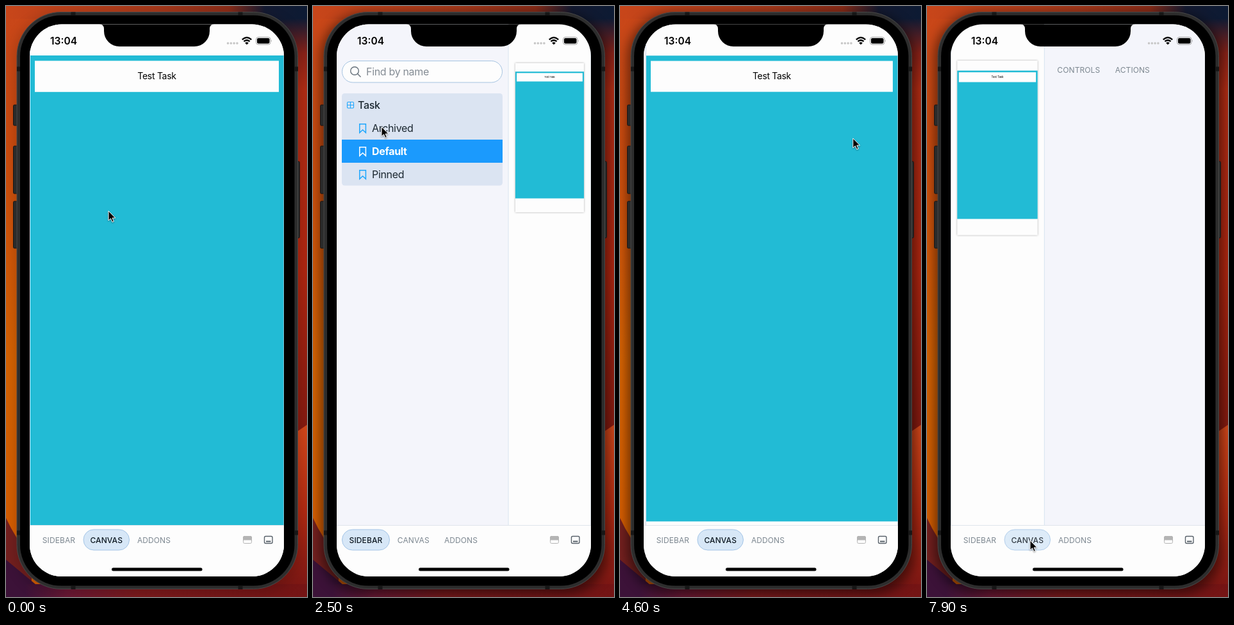
These frames come from a looping animation (470x920 px, 8 s). An HTML page:

```html
<!DOCTYPE html>
<html lang="en">
<head>
<meta charset="utf-8">
<title>Phone story browser</title>
<style>
  html, body { margin: 0; width: 100%; height: 100%; overflow: hidden; background: #7a1a10; }
  svg { display: block; width: 470px; height: 920px; }
  text { font: 16px Inter, "Open Sans", sans-serif; letter-spacing: -.02em; fill: #1b2730; }
  .mid { text-anchor: middle; }
  .tab { font-size: 12px; letter-spacing: .1px; text-anchor: middle; fill: #7c8790; }
  .on .tab { fill: #0f1a24; font-weight: 500; }
  .pill { fill: #d7e7f7; stroke: #a3c4e6; visibility: hidden; }
  .on .pill { visibility: visible; }
  .mark { fill: none; stroke: #1ea7fd; stroke-width: 1.5; }
  .row rect { fill: none; }
  .row.on rect { fill: #1b9afd; }
  .row.on text { fill: #fff; font-weight: 700; }
  .row.on .mark { stroke: #fff; }
  .field { fill: #fdfdfd; stroke: #a5c3e0; }
  .json text { font-size: 14px; letter-spacing: 0; }
  .panel { fill: #f4f5fb; }
  .edge { stroke: #d6e2f0; }
  .key { fill: #2b2b2b; stroke: #151515; }
</style>
</head>
<body>
<svg viewBox="0 0 470 920">
  <defs>
    <linearGradient id="left" x2="0" y2="1">
      <stop offset="0" stop-color="#c8461a"/><stop offset=".25" stop-color="#cc4c0e"/>
      <stop offset=".6" stop-color="#d66303"/><stop offset=".86" stop-color="#d65e02"/>
    </linearGradient>
    <linearGradient id="right" x2="0" y2="1">
      <stop offset=".02" stop-color="#0c1a33"/><stop offset=".08" stop-color="#8a2218"/>
      <stop offset=".14" stop-color="#b02c14"/><stop offset=".45" stop-color="#ae2610"/>
      <stop offset=".72" stop-color="#841a10"/>
    </linearGradient>
    <linearGradient id="glow" x2="0" y2="1">
      <stop offset="0" stop-color="#d4481a"/><stop offset=".5" stop-color="#b22a12"/><stop offset="1" stop-color="#741414"/>
    </linearGradient>
    <linearGradient id="top">
      <stop offset="0" stop-color="#c8461a"/><stop offset=".5" stop-color="#a4381a"/>
      <stop offset=".74" stop-color="#8a2c18"/><stop offset=".86" stop-color="#141a31"/><stop offset="1" stop-color="#0c1a33"/>
    </linearGradient>
    <linearGradient id="base">
      <stop offset="0" stop-color="#3c1238"/><stop offset=".15" stop-color="#6a1834"/>
      <stop offset=".4" stop-color="#7c1a1c"/><stop offset="1" stop-color="#741414"/>
    </linearGradient>
    <clipPath id="screen"><rect x="37" y="28.5" width="397" height="859.5" rx="50"/></clipPath>
    <filter id="blur" x="-20%" width="140%" y="-10%" height="120%"><feGaussianBlur stdDeviation="9"/></filter>
  </defs>

  <!-- wallpaper -->
  <rect width="235" height="920" fill="url(#left)"/>
  <rect x="235" width="235" height="920" fill="url(#right)"/>
  <rect width="470" height="20" fill="url(#top)"/>
  <path d="M420 686L470 652V920H420Z" fill="url(#glow)"/>
  <path d="M0 797Q14 828 40 860V920H0Z" fill="#74201f"/>
  <path d="M0 862L70 920H0Z" fill="#3c1238"/>
  <rect x="30" y="900" width="440" height="20" fill="url(#base)"/>
  <rect id="shade" x="12" y="12" width="449" height="904" rx="68" filter="url(#blur)"/>

  <!-- phone body -->
  <g class="key">
    <rect x="11.5" y="154" width="8" height="32" rx="1.5"/>
    <rect x="11.5" y="218" width="8" height="74" rx="1.5"/>
    <rect x="11.5" y="304" width="8" height="73" rx="1.5"/>
    <rect x="451" y="242" width="7.5" height="119" rx="1.5"/>
  </g>
  <rect x="17" y="9.5" width="438.5" height="898" rx="69" fill="#2d2d2d" stroke="#484848"/>
  <path d="M105 9.5v5M366 9.5v5M105 903v5M366 903v5M17 98h5M17 820h5M451 98h5M451 820h5" stroke="#171717" stroke-width="7"/>
  <rect x="22" y="14.5" width="428.5" height="888" rx="64"/>

  <g clip-path="url(#screen)">
    <rect x="37" y="28" width="397" height="860" fill="#fdfdfd"/>
    <g id="preview">
      <rect x="37" y="28" width="397" height="860" fill="#fdfdfd" style="filter:drop-shadow(0 0 5px #0005)"/>
      <rect x="37" y="77" width="397" height="731" fill="#22bbd5"/>
      <rect x="45" y="85.3" width="381" height="48.5" fill="#fdfdfd"/>
      <text class="mid" x="235.5" y="114.2" style="font-size:14px;fill:#000">Test Task</text>
    </g>

    <g id="sidebar">
      <rect class="panel" x="37" y="28" width="267.5" height="780"/>
      <path class="edge" d="M305 28V808"/>
      <rect class="field" x="45.5" y="85.5" width="250" height="33.5" rx="16.75"/>
      <g fill="none" stroke="#66717b" stroke-width="1.4"><circle cx="65" cy="101" r="6.3"/><path d="M69.6 105.6L74.5 110.5"/></g>
      <text x="83" y="108" style="fill:#848c94">Find by name</text>
      <rect x="45" y="136" width="251" height="143.5" rx="4.5" fill="#dbe4f2"/>
      <g class="mark" style="stroke-width:1.1"><rect x="53.5" y="149.5" width="10" height="9.5" rx="1.5"/><path d="M58.5 149.5V159M53.5 154.2H63.5"/></g>
      <text x="70" y="159.7" style="font-weight:500">Task</text>
      <g id="rows"></g>
    </g>

    <g id="addons">
      <rect class="panel" x="166.5" y="28" width="268" height="780"/>
      <path class="edge" d="M166.5 28V808"/>
      <g id="controls">
        <rect class="pill" x="175.5" y="83.5" width="89.5" height="31.5" rx="15.75"/>
        <text class="tab" x="220" y="104.2">CONTROLS</text>
      </g>
      <text class="tab" x="304" y="104.2">ACTIONS</text>
      <g id="form" class="json">
        <text x="175.3" y="144" style="font-size:14.5px;font-weight:500">task</text>
        <rect class="field" x="175.5" y="152" width="250" height="97.5" rx="5"/>
        <text x="182" y="171">{</text>
        <text x="190" y="188">"id": "1",</text>
        <text x="190" y="205">"title": "Test Task",</text>
        <text x="190" y="222">"state": "TASK_ARCHIVED"</text>
        <text x="182" y="239">}</text>
        <rect class="field" x="175.5" y="266.5" width="250" height="35" rx="5" style="fill:#f4f5fb"/>
        <text class="mid" x="300.5" y="289" style="font-weight:700">RESET</text>
      </g>
    </g>

    <!-- bottom navigation -->
    <rect x="37" y="808" width="397" height="80" fill="#fdfdfd"/>
    <path d="M37 808.5H434" stroke="#dfe5ec"/>
    <g id="tabs"></g>
    <rect x="370.5" y="825.5" width="13" height="11" rx="2" fill="none" stroke="#b4b4b4"/>
    <path d="M370 831.5V827.5q0-2.5 2.5-2.5h9q2.5 0 2.5 2.5v4Z" fill="#b4b4b4"/>
    <rect x="403.5" y="825.5" width="12.5" height="11" rx="2" fill="none" stroke="#59626b" stroke-width="1.4"/>
    <path d="M406 833.5h7.5" stroke="#59626b" stroke-width="1.8"/>
    <rect x="165" y="874.5" width="141.5" height="5" rx="2.5"/>

    <!-- status bar -->
    <path d="M146 28Q153 28.5 153 36V39A24 24 0 0 0 177 63H294A24 24 0 0 0 318 39V36Q318 28.5 325 28Z"/>
    <text class="mid" x="90" y="59.7" style="font-size:15.5px;font-weight:600;letter-spacing:0;fill:#000">13:04</text>
    <path d="M346.5 58h16" stroke="#c6c6c6" stroke-width="3.6" stroke-linecap="round" stroke-dasharray="0 4.8"/>
    <path d="M368.8 52.3Q376 45.8 383.2 52.3M371.4 55.2Q376 51.2 380.6 55.2" fill="none" stroke="#000" stroke-width="2.3"/>
    <path d="M373.2 57.4Q376 55.2 378.8 57.4L376 60.3Z"/>
    <rect x="390.5" y="48.5" width="22.5" height="11.5" rx="3.5" fill="none" stroke="#a2a2a2"/>
    <rect x="392" y="50" width="19.5" height="8.5" rx="2.2"/>
    <path d="M414.2 52.5q1.6 1.7 0 3.5Z" fill="#a2a2a2"/>
  </g>

  <path id="cursor" d="M0 0V15L3.5 11.8L6 17.3L8.4 16.3L6 11H10.8Z" stroke="#fff" style="filter:drop-shadow(0 1px 1px #0006)"/>
</svg>
<script>
const $ = id => document.getElementById(id);
const LOOP = 8000, STEP = 100, SLIDE = 400, PANEL = 267.5, PICK = 2800;

// taps on the navigation: time, position before, position after, tab
const taps = [[1170, 0, -1, 0], [4223, -1, 0, 1], [6100, 0, 1, 2], [7841, 1, 0, 1]];
// pointer stops: time, x, y
const stops = [
  [100, 160, 319], [1000, 82, 823], [1500, 82, 823], [2300, 107, 188], [3000, 107, 188],
  [3900, 367, 188], [4500, 367, 188], [5500, 252, 829], [5700, 252, 829], [6000, 243, 829],
  [7000, 243, 829], [7700, 161, 832]
];

$('rows').innerHTML = ['Archived', 'Default', 'Pinned'].map((name, i) => `
  <g class="row" transform="translate(0 ${172 + 36 * i})"><rect x="45" width="251" height="36"/>
  <path class="mark" d="M72.8 11.8H82.4V25.3L77.6 20.8L72.8 25.3Z"/><text x="92" y="23.7">${name}</text></g>`).join('');
$('tabs').innerHTML = [['SIDEBAR', 45, 75], ['CANVAS', 120.5, 72.5], ['ADDONS', 193.5, 75]].map(([name, x, w]) => `
  <g><rect class="pill" x="${x + .5}" y="815" width="${w - 1}" height="32" rx="16"/>
  <text class="tab" x="${x + w / 2}" y="835.5">${name}</text></g>`).join('');
const rows = [...$('rows').children], tabs = [...$('tabs').children];

const clamp = v => Math.min(1, Math.max(0, v));
const smooth = v => v * v * (3 - 2 * v);

// cubic-bezier(.42, 0, 1, 1), solved by bisection
function easeIn(x) {
  let lo = 0, hi = 1;
  for (let i = 0; i < 24; i++) {
    const s = (lo + hi) / 2, r = 1 - s;
    if (1.26 * r * r * s + 3 * r * s * s + s * s * s < x) lo = s; else hi = s;
  }
  return smooth(lo);
}
const easeInOut = u => u < .5 ? easeIn(2 * u) / 2 : 1 - easeIn(2 - 2 * u) / 2;
const shift = (id, x, y = 0) => $(id).setAttribute('transform', `translate(${x} ${y})`);

function pointer(t) {
  const i = stops.findIndex(s => s[0] > t);
  if (i === 0) return stops[0].slice(1);
  if (i < 0) return stops.at(-1).slice(1);
  const [t0, x0, y0] = stops[i - 1], [t1, x1, y1] = stops[i];
  const k = smooth((t - t0) / (t1 - t0));
  return [x0 + (x1 - x0) * k, y0 + (y1 - y0) * k];
}

function draw(t) {
  const tap = taps.findLast(s => s[0] <= t);
  const [start, from, to, tab] = tap || [-SLIDE, 0, 0, 1];
  const pos = from + (to - from) * easeInOut(clamp((t - start) / SLIDE));
  const q = Math.abs(pos);

  $('preview').setAttribute('transform',
    `translate(${235.5 - 134 * pos} ${458 - 253 * q}) scale(${1 - .73 * q}) translate(-235.5 -458)`);
  shift('sidebar', -PANEL * (1 - Math.max(0, -pos)));
  shift('addons', PANEL * (1 - Math.max(0, pos)));

  tabs.forEach((el, i) => {
    el.classList.toggle('on', i === tab);
    el.style.opacity = i === tab ? .8 + .2 * clamp((t - start) / 300) : 1;
  });
  rows.forEach((el, i) => el.classList.toggle('on', i === (t < PICK ? 1 : 0)));
  $('controls').classList.toggle('on', tab === 2);
  $('form').style.visibility = tab === 2 ? 'visible' : 'hidden';
  $('shade').style.opacity = tap ? .5 : .15;
  shift('cursor', ...pointer(t));
}

const began = performance.now();
function tick() {
  const t = (performance.now() - began) % LOOP;
  draw(Math.floor(t / STEP) * STEP);
  requestAnimationFrame(tick);
}
tick();
</script>
</body>
</html>
```
